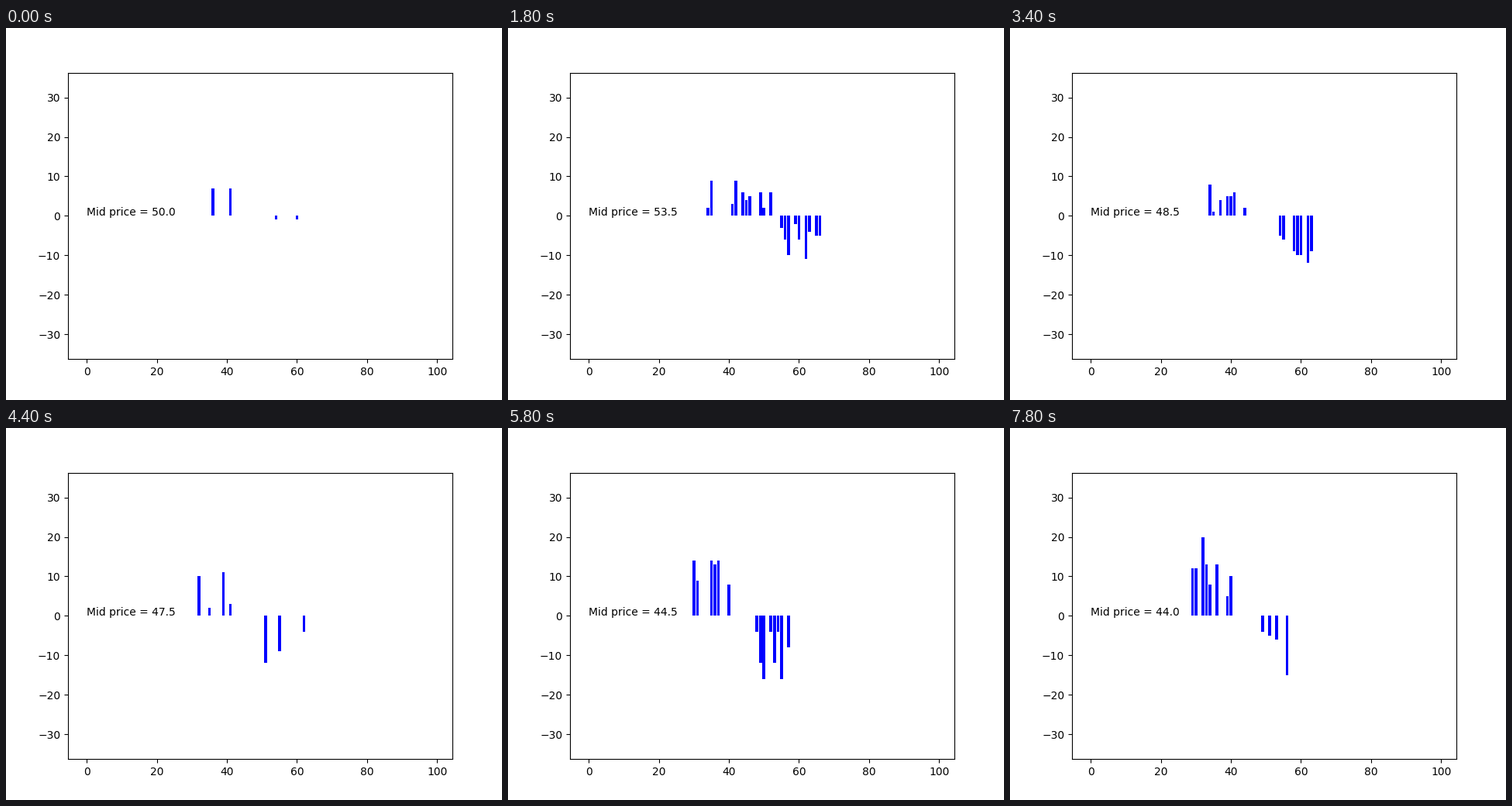
These frames come from a looping animation (640 by 480 pixels, 8000 ms). A matplotlib script:

```python
import matplotlib.pyplot as plt
import numpy as np
from matplotlib.animation import FuncAnimation

FRAMES, STEP = 40, 200
LEVELS = 100
REFRESH = 6     # steps before a level's order is drawn anew
OPENING = 5     # steps until the book is fully populated
DENSITY = 0.45

# step, quoted mid, lowest bid, best bid, best ask, highest ask, bid size, ask size
KEYS = np.array([
    (0, 50, 36, 41, 54, 60, 7, 1),
    (5, 56.5, 32, 55, 58, 70, 8, 9),
    (12, 51.5, 35, 49, 52, 63, 10, 12),
    (17, 48.5, 34, 44, 54, 63, 8, 12),
    (26, 46.5, 31, 39, 48, 62, 20, 23),
    (33, 42, 28, 42, 48, 51, 18, 10),
    (39, 44, 29, 40, 49, 56, 25, 17),
])

prices = np.arange(LEVELS)
rng = np.random.default_rng(7)
epochs = FRAMES // REFRESH + 2
presence = rng.random((epochs, LEVELS))
weight = rng.uniform(0.15, 1, (epochs, LEVELS))
phase = rng.integers(0, REFRESH, LEVELS)


def market(i):
    """Market state at step i, gliding between the key points."""
    return [np.interp(i, KEYS[:, 0], col) for col in KEYS[:, 1:].T]


def side(i, low, high, size):
    """Orders on one side: both ends always quoted, random levels between."""
    low, high = round(low), round(high)
    busy = min(1, i / OPENING)
    epoch = (i + phase) // REFRESH
    inside = (prices >= low) & (prices <= high)
    ends = (prices == low) | (prices == high)
    active = inside & (ends | (presence[epoch, prices] < DENSITY * busy))
    share = 1 - busy * (1 - weight[epoch, prices])
    return np.where(active, np.maximum(1, np.round(size * share)), 0)


fig, ax = plt.subplots(figsize=(6.4, 4.8), dpi=100)
bars = ax.bar(prices, np.zeros(LEVELS), color="blue")
label = ax.text(0, 0, "")
ax.set_xlim(-5.39, 104.39)
ax.set_ylim(-36.3, 36.3)


def draw(i):
    mid, low, bid, ask, high, bid_size, ask_size = market(i)
    book = side(i, low, bid, bid_size) - side(i, ask, high, ask_size)
    for bar, size in zip(bars, book):
        bar.set_height(size)
        bar.set_visible(size != 0)
    label.set_text(f"Mid price = {round(2 * mid) / 2:.1f}")
    return [*bars, label]


anim = FuncAnimation(fig, draw, frames=FRAMES, interval=STEP,
                     init_func=lambda: draw(0), repeat=True, repeat_delay=0)
plt.show()
```
